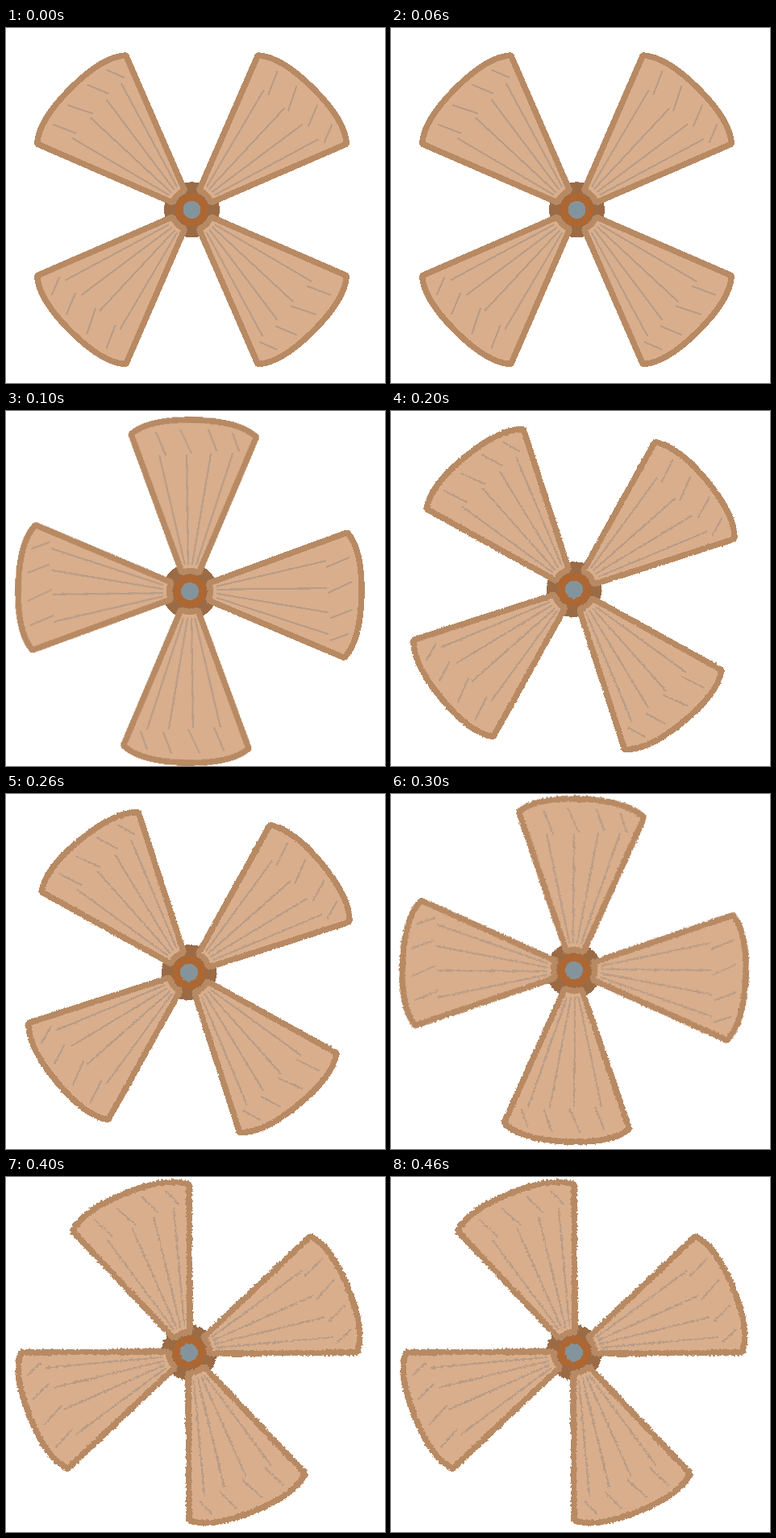
Animation of 470x441 px, one loop 500 ms. Source, as an HTML page:

```html
<!DOCTYPE html>
<html lang="en">
<head>
<meta charset="utf-8">
<title>Wooden fan</title>
<style>
  html, body { margin: 0; width: 100%; height: 100%; overflow: hidden; background: #fff; }
  svg { display: block; width: 470px; height: 441px; shape-rendering: crispEdges; }
  .blade { fill: #d9ae8c; stroke: #b88a63; stroke-width: 7.5; stroke-linejoin: bevel; }
  .grain { fill: none; stroke: #b99c86; stroke-width: 2.2; }
</style>
</head>
<body>
<svg viewBox="0 0 470 441">
  <defs>
    <filter id="rough" filterUnits="userSpaceOnUse" x="0" y="0" width="470" height="441" color-interpolation-filters="sRGB">
      <feTurbulence type="fractalNoise" baseFrequency="0.4" numOctaves="1" seed="4"/>
      <feDisplacementMap id="shift" in="SourceGraphic" scale="0" xChannelSelector="R" yChannelSelector="G"/>
    </filter>
    <g id="blade">
      <path class="blade" d="M-10.5-23L-77.8-193.5C-63-207-36-213-0-213S63-207 77.8-193.5L10.5-23A25 25 0 0 0-10.5-23Z"/>
      <path class="grain" d="M-7-33L-42-168M-3-33L-8-170M2-33L22-172M7-33L49-173
        M-47-197L-34-168M-17-201L-2-171M18-202L29-175M48-198L57-175"/>
    </g>
  </defs>
  <g id="stage">
    <g id="fan">
      <circle r="34.5" fill="#9b6b46"/>
      <use href="#blade"/>
      <use href="#blade" transform="rotate(90)"/>
      <use href="#blade" transform="rotate(180)"/>
      <use href="#blade" transform="rotate(270)"/>
      <circle r="20.5" fill="#ad6733"/>
      <circle r="11" fill="#84949c"/>
    </g>
  </g>
</svg>
<script>
  const STEP = 100;
  // x, y, angle, edge roughness
  const poses = [
    [230.5, 225.8, 45, 0],
    [228, 224, 91.4, 2],
    [227, 221.7, 140.6, 3],
    [227, 219, 182.7, 4],
    [227, 218, 248.1, 5]
  ];
  const $ = id => document.getElementById(id);
  const start = performance.now();
  let shown = -1;

  function draw(now) {
    const i = Math.floor(Math.max(0, now - start) / STEP) % poses.length;
    if (i !== shown) {
      const [x, y, angle, rough] = poses[i];
      $('fan').setAttribute('transform', `translate(${x} ${y}) rotate(${angle})`);
      $('shift').setAttribute('scale', rough);
      $('stage').setAttribute('filter', rough ? 'url(#rough)' : 'none');
      shown = i;
    }
    requestAnimationFrame(draw);
  }
  draw(start);
</script>
</body>
</html>
```
